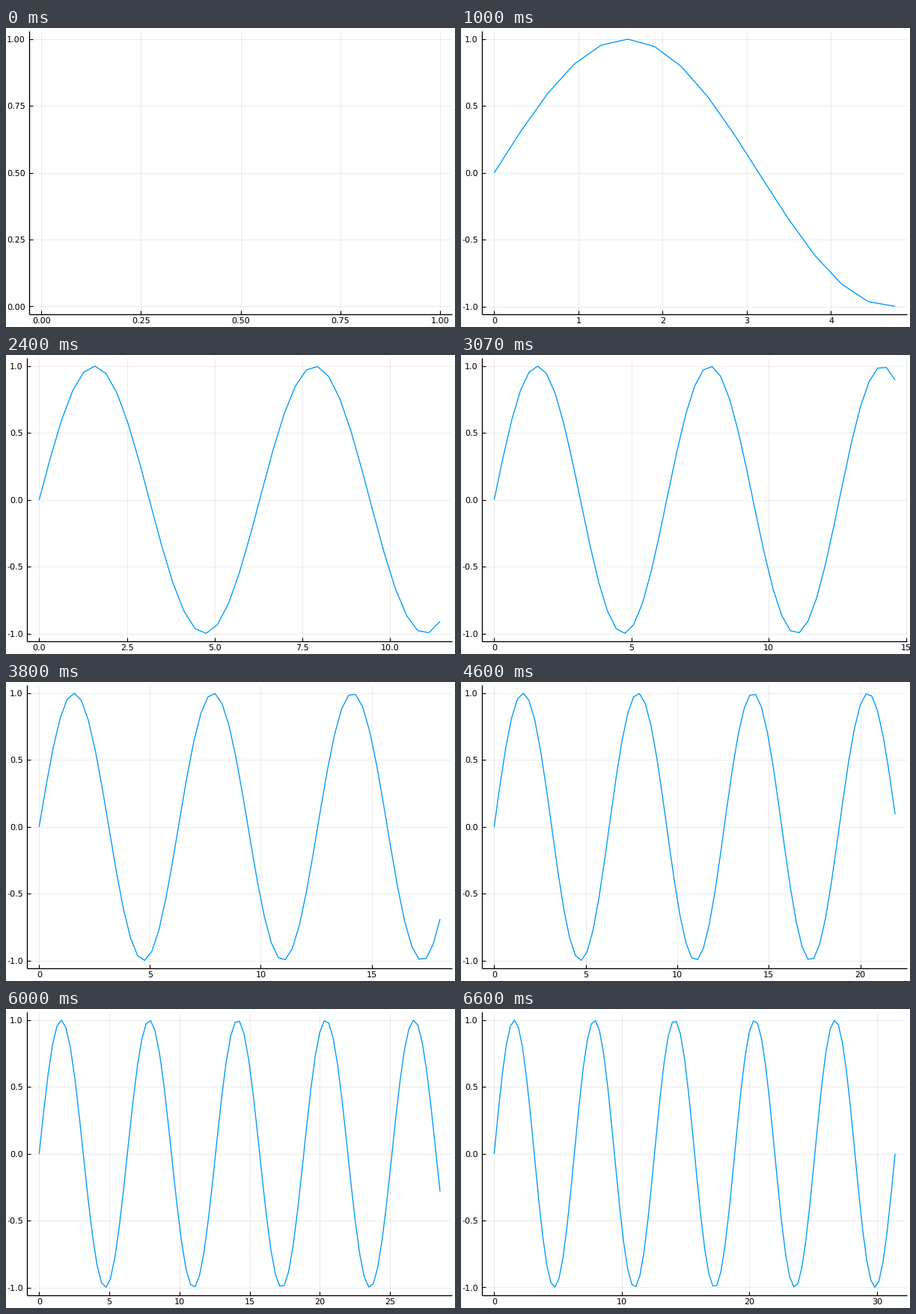
Animation, 600 px wide and 400 px high, one loop 6.67 s. Source, as a matplotlib script:

```python
import numpy as np
import matplotlib
import matplotlib.pyplot as plt
from matplotlib.animation import FuncAnimation

matplotlib.rcParams["font.family"] = "DejaVu Sans"
matplotlib.rcParams["text.hinting"] = "none"

W, H, DPI = 600, 400, 100
FRAMES, FPS = 100, 15
RIGHT, TOP, BOTTOM = 596.1, 4.2, 383.1
FONT_PX = 11.1
PAD = 0.03
BLUE = "#009afa"
# tick step mantissas and how nice each one is
NICE = {1: 1.0, 5: 0.9, 2: 0.7, 2.5: 0.5, 3: 0.2}
GLYPH = {".": 0.318, "-": 0.361}

x = np.linspace(0, 10 * np.pi, FRAMES)
y = np.sin(x)


def pt(px):
    return px * 72 / DPI


def limits(v):
    lo, hi = v.min(), v.max()
    if hi <= lo:
        hi = lo + 1
    pad = PAD * (hi - lo)
    return lo - pad, hi + pad


def find_ticks(lo, hi):
    """Pick the step with the best mix of count, coverage and niceness."""
    span = hi - lo
    top = int(np.ceil(np.log10(span)))
    best, best_key = None, None
    for z in range(top, top - 3, -1):
        for q, nice in NICE.items():
            step = q * 10.0 ** z
            first, last = int(np.ceil(lo / step)), int(np.floor(hi / step))
            n = last - first + 1
            if not 4 <= n <= 8:
                continue
            count = 1 - abs(n - 5) / 5
            cover = 1.5 * span / ((n - 1) * step)
            score = count / 4 + cover / 3 + nice / 4
            key = (round(score, 9), z, -n)
            if best is None or key > best_key:
                best, best_key = np.arange(first, last + 1) * step, key
    return best


def labels(ticks):
    digits = 0
    while np.abs(ticks - np.round(ticks, digits)).max() > 1e-9:
        digits += 1
    return [f"{t + 0.0:.{digits}f}" for t in ticks]


def text_width(s):
    return FONT_PX * sum(GLYPH.get(c, 0.636) for c in s)


fig = plt.figure(figsize=(W / DPI, H / DPI), dpi=DPI, facecolor="white")
ax = fig.add_axes([0, 0, 1, 1])


def line(xs, ys, width=1.35, color="black", snap=True, **kw):
    ax.plot(xs, ys, color=color, lw=pt(width), snap=snap,
            solid_capstyle="butt", solid_joinstyle="round", **kw)


def label(px, py, s, ha):
    ax.text(px, py, s, ha=ha, va="baseline", fontsize=pt(FONT_PX))


def draw(i):
    ax.clear()
    ax.set_xlim(0, W)
    ax.set_ylim(H, 0)
    ax.axis("off")

    xs, ys = x[:i + 1], y[:i + 1]
    (x0, x1), (y0, y1) = limits(xs), limits(ys)
    xt, yt = find_ticks(x0, x1), find_ticks(y0, y1)
    ylab = labels(yt)
    left = 6.6 + max(map(text_width, ylab))

    def px(v):
        return left + (v - x0) / (x1 - x0) * (RIGHT - left)

    def py(v):
        return BOTTOM - (v - y0) / (y1 - y0) * (BOTTOM - TOP)

    grid = dict(width=1, alpha=0.08)
    for t, s in zip(px(xt), labels(xt)):
        line([t, t], [TOP, BOTTOM], **grid)
        line([t, t], [BOTTOM, BOTTOM - 5], width=1.1)
        label(t, 395.3, s, "center")
    for t, s in zip(py(yt), ylab):
        line([left, RIGHT], [t, t], **grid)
        line([left, left + 5], [t, t], width=1.1)
        label(left - 5.4, t + 4, s, "right")
    line([left, left], [TOP, BOTTOM], )
    line([left, RIGHT], [BOTTOM, BOTTOM])

    if i:
        line(px(xs), py(ys), color=BLUE, snap=False)
    return []


anim = FuncAnimation(fig, draw, frames=FRAMES, init_func=lambda: draw(0),
                     interval=1000 / FPS, repeat=True, repeat_delay=0)
plt.show()
```
